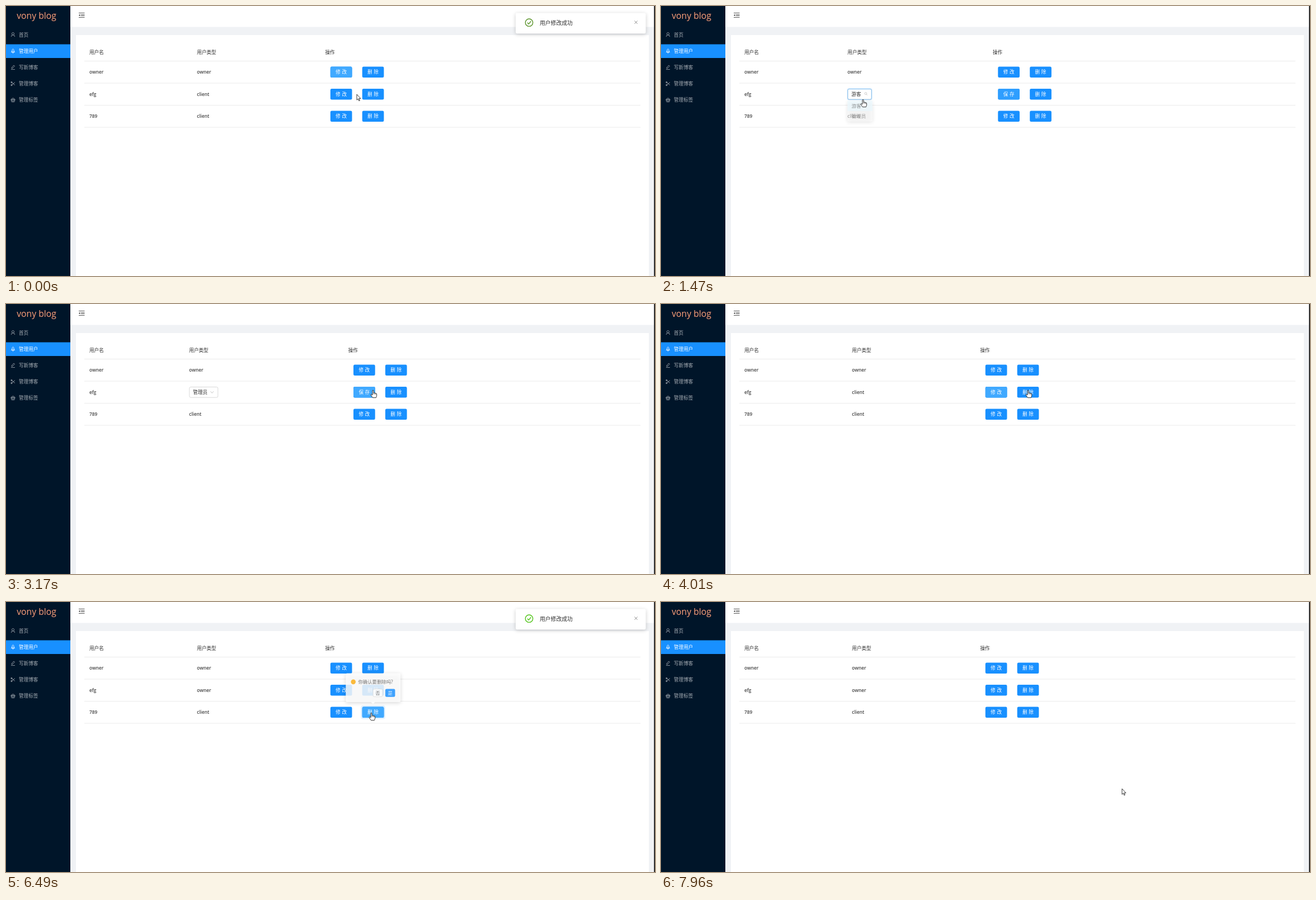
Recreate the animation shown at these times as an HTML page with a canvas. Size 1160 px wide and 483 px high, loop 8000 ms.

```html
<!DOCTYPE html>
<html lang="en">
<head>
<meta charset="utf-8">
<style>
html, body { margin: 0; width: 100%; height: 100%; overflow: hidden; background: #f0f2f5; }
canvas { display: block; }
</style>
</head>
<body>
<canvas id="stage" width="1160" height="483"></canvas>
<script>
const LOOP = 8000;
const ctx = document.getElementById('stage').getContext('2d');
const BLUE = '#1890ff', LIGHT = '#40a9ff', DARK = '#303030';

// Key moments of the story, in ms
const EDIT = 540, OPEN = 1400, PICK = 1950, BLUR = 2930, SAVE = 3780, DONE = 3940,
  UPDATED = 4500, ASK = 6400, CLOSE = 7260;

// time, x, y of the pointer tip, pointer shape from then on
const pointerKeys = [
  [0, 627, 158, 'arrow'], [80, 627, 158, 'arrow'], [360, 606, 157, 'hand'], [620, 606, 157, 'hand'],
  [850, 560, 162, 'arrow'], [1310, 361, 164, 'hand'], [1470, 361, 167, 'hand'], [1700, 357, 180, 'hand'],
  [1780, 356, 200, 'hand'], [1930, 356, 200, 'hand'], [2010, 375, 202, 'arrow'], [2390, 640, 180, 'arrow'],
  [2470, 656, 177, 'arrow'], [2700, 674, 155, 'arrow'], [2780, 656, 154, 'hand'], [4470, 656, 154, 'hand'],
  [4930, 662, 161, 'hand'], [6020, 662, 161, 'hand'], [6180, 656, 176, 'arrow'], [6330, 653, 198, 'hand'],
  [6560, 653, 198, 'hand'], [6800, 684, 168, 'hand'], [7030, 685, 163, 'hand'], [7260, 685, 163, 'hand'],
  [7420, 710, 190, 'arrow'], [7880, 822, 330, 'arrow'], [7960, 824, 334, 'arrow']
];

const arrowPath = new Path2D('M0 0V10.2L2.3 8.1L3.9 11.8L5.4 11.1L3.9 7.6H7Z');
const handPath = new Path2D('M-1 1Q0 -.8 1.1 1V5Q2.4 4.2 3.1 5.4Q4.4 4.8 5 6Q6.6 5.6 6.6 7.5V10.2L5.4 13.6H-.6L-3.7 9Q-4 7.3 -2.6 7.6L-1 9Z');

const ramp = (t, start, length) => Math.max(0, Math.min(1, (t - start) / length));
const pulse = (t, on, off, fade = 120) => ramp(t, on, fade) * (1 - ramp(t, off, fade));

function text(value, x, y, { size = 8.6, color = DARK, weight = 400, align = 'left' } = {}) {
  ctx.font = `${weight} ${size}px "Open Sans", "Noto Sans CJK SC", "Noto Sans CJK", sans-serif`;
  ctx.fillStyle = color;
  ctx.textAlign = align;
  ctx.fillText(value, x, y + size * 0.36);
}

function rect(x, y, w, h, color) {
  ctx.fillStyle = color;
  ctx.fillRect(x, y, w, h);
}

function box(x, y, w, h, fill, stroke, radius = 2.4) {
  ctx.beginPath();
  ctx.roundRect(x, y, w, h, radius);
  if (fill) { ctx.fillStyle = fill; ctx.fill(); }
  if (stroke) { ctx.strokeStyle = stroke; ctx.stroke(); }
}

function line(path, color, width = 1) {
  ctx.strokeStyle = color;
  ctx.lineWidth = width;
  ctx.stroke(new Path2D(path));
  ctx.lineWidth = 1;
}

function layer(alpha, draw) {
  if (alpha <= 0) return;
  ctx.save();
  ctx.globalAlpha *= alpha;
  draw();
  ctx.restore();
}

function panel(x, y, w, h) {
  ctx.save();
  ctx.shadowColor = 'rgba(0,0,0,.2)';
  ctx.shadowBlur = 7;
  ctx.shadowOffsetY = 1.5;
  box(x, y, w, h, '#fff');
  ctx.restore();
}

function button(x, y, label, lit = 0, glow = 0) {
  layer(glow, () => box(x - 2.5, y - 12.3, 43.7, 24.6, 'rgba(24,144,255,.17)', null, 4));
  box(x, y - 9.8, 38.7, 19.6, BLUE);
  layer(lit, () => box(x, y - 9.8, 38.7, 19.6, LIGHT));
  text(label[0], x + 9.4, y, { color: '#fff', weight: 500 });
  text(label[1], x + 20.6, y, { color: '#fff', weight: 500 });
}

function sidebar() {
  rect(0, 0, 115, 483, '#001529');
  text('vony blog', 54.5, 17.5, { size: 15.7, color: '#ffa07a', align: 'center' });
  rect(0, 68.5, 115, 24.5, BLUE);
  const icons = [
    'M9.3 55Q9.3 51.7 12.5 51.7T15.7 55M14.6 49.7A2.1 2.1 0 1 1 10.4 49.7A2.1 2.1 0 1 1 14.6 49.7',
    'M11 82.5V79Q11 77.5 12.5 76.6Q14 77.5 14 79V82.5ZM11 80L9.5 82.7H15.5L14 80M12.5 83V85',
    'M9 113.5H16M10 111.7L10.5 109.5L14 106L15.5 107.5L12 111Z',
    'M9.5 136L16 141.5M9.5 142L16 136.5M9 135.6h1.8v1.8h-1.8zM9 140.6h1.8v1.8h-1.8z',
    'M12.5 164.5L16.2 167.2L14.8 171.6H10.2L8.8 167.2ZM12.5 166.5L14.4 168L13.7 170H11.3L10.6 168ZM9 167.2H16'
  ];
  ['首页', '管理用户', '写新博客', '管理博客', '管理标签'].forEach((label, i) => {
    const color = i === 1 ? '#fff' : '#a6adb4';
    line(icons[i], color, 0.8);
    text(label, 23, 51.5 + i * 29.2, { color, weight: i === 1 ? 500 : 400 });
  });
}

function frame() {
  rect(0, 0, 1160, 483, '#f0f2f5');
  rect(115, 0, 1043, 37.5, '#fff');
  rect(125, 52, 1024, 431, '#fff');
  sidebar();
  line('M130 12.5H140.5M134 15.5H140.5M134 17.5H140.5M130 20.5H140.5', '#444', 0.9);
  ctx.fillStyle = '#444';
  ctx.fill(new Path2D('M130 16.5L132.5 14.6V18.4Z'));
}

function select(t, x) {
  const picked = t >= PICK, w = picked ? 52 : 43.5;
  const focus = pulse(t, OPEN, BLUR);
  layer(focus, () => box(x - 1, 147, w + 2, 21.6, 'rgba(24,144,255,.2)', null, 3.4));
  box(x + .5, 148.5, w - 1, 18.7, '#fff', '#d9d9d9');
  layer(focus, () => box(x + .5, 148.5, w - 1, 18.7, null, LIGHT));
  text(picked ? '管理员' : '游客', x + 7, 158);
  const ix = x + w - 11;
  if (t >= OPEN && t < PICK) {
    line(`M${ix + 2} 156.5a1.9 1.9 0 1 1 -3.8 0a1.9 1.9 0 1 1 3.8 0M${ix + 1.5} 158L${ix + 3} 159.7`, '#bfbfbf', 0.8);
  } else {
    line(`M${ix - 2.7} 156.2L${ix} 159.4L${ix + 2.7} 156.2`, '#bfbfbf', 0.9);
  }
}

function dropdown(t) {
  const shown = pulse(t, OPEN, PICK, 130);
  layer(shown, () => {
    const x = 333.3, hover = t >= 1700;
    ctx.translate(0, 169.5);
    ctx.scale(1, 0.86 + 0.14 * shown);
    panel(x, 0, 44.5, 39.4);
    rect(x, 0, 44.5, 19.7, hover ? '#fafafa' : '#e6f7ff');
    if (hover) rect(x, 19.7, 44.5, 19.7, '#e6f7ff');
    text('游客', x + 7.3, 9.9, { color: '#444', weight: hover ? 500 : 400 });
    text('管理员', x + 7.3, 29.5, { color: '#444' });
  });
}

function table(t) {
  const editing = t >= EDIT && t < DONE;
  const [typeX, actionX] = !editing ? [341.3, 570.5] : t < PICK ? [333.3, 593] : [327.3, 611.7];
  text('用户名', 149, 82.5, { weight: 500 });
  text('用户类型', typeX, 82.5, { weight: 500 });
  text('操作', actionX, 82.5, { weight: 500 });
  for (const y of [98, 137.5, 177, 216.5]) rect(140, y, 994, 1, '#ebebeb');

  const cell = { size: 8.3, weight: 600, color: '#444' };
  const editLit = [
    1 - ramp(t, 480, 100),
    Math.max(pulse(t, 330, OPEN, 160), pulse(t, BLUR, ASK - 30)),
    0
  ];
  const removeLit = [0, pulse(t, 4030, 6120), pulse(t, 6330, 7300)];
  const removeGlow = [0, 0, pulse(t, 6400, 6750)];
  const roles = ['owner', t >= UPDATED + 60 ? 'owner' : 'client', 'client'];
  ['owner', 'efg', '789'].forEach((name, i) => {
    const y = 118.3 + i * 39.5, edited = editing && i === 1;
    text(name, 149, y, cell);
    if (edited) select(t, typeX);
    else text(roles[i], typeX, y, cell);
    const saveGlow = i === 1 ? pulse(t, SAVE - 60, DONE - 60, 60) : 0;
    button(actionX + 9.3, y, edited ? '保存' : '修改', editLit[i], saveGlow);
    button(actionX + 66.2, y, '删除', removeLit[i], removeGlow[i]);
  });
}

function confirmBox(t) {
  const shown = pulse(t, ASK, CLOSE, 110);
  layer(shown, () => {
    const scale = 0.85 + 0.15 * shown;
    ctx.translate(656, 183);
    ctx.scale(scale, scale);
    ctx.translate(-656, -183);
    panel(606, 126, 100.5, 53);
    ctx.fillStyle = '#fff';
    ctx.fill(new Path2D('M652 178.5H660L656 182.8Z'));
    ctx.fillStyle = '#faad14';
    ctx.beginPath();
    ctx.arc(619.8, 141.8, 4.4, 0, Math.PI * 2);
    ctx.fill();
    text('你确认要删除吗?', 628.7, 142, { color: '#595959' });
    box(656, 155, 17.5, 14, '#fff', '#d9d9d9');
    text('否', 664.7, 162, { color: '#595959', align: 'center' });
    box(678.5, 154.7, 18, 14.8, BLUE);
    layer(ramp(t, 6800, 150), () => box(678.5, 154.7, 18, 14.8, LIGHT));
    text('是', 687.5, 162, { color: '#fff', align: 'center' });
  });
}

function toast(t) {
  const first = t < 2000;
  const enter = first ? 1 : ramp(t, UPDATED, 180);
  const leave = ramp(t, first ? 1000 : 6600, 140);
  layer(enter * (1 - leave), () => {
    ctx.translate(247 * (1 - enter) ** 2, 0);
    panel(911, 12.5, 232.5, 36.7);
    const green = first ? '#5b942b' : '#52c41a';
    line('M941.7 29.7A6.7 6.7 0 1 1 928.3 29.7A6.7 6.7 0 1 1 941.7 29.7M931.9 29.7L934.3 32.2L938.3 27.2', green, 1.4);
    text('用户修改成功', 954, 30, { size: 9.8 });
    line('M1123.4 26.3L1128.6 32M1128.6 26.3L1123.4 32', '#8c8c8c', 0.9);
  });
}

function pointer(t) {
  let i = pointerKeys.findLastIndex(key => key[0] <= t);
  const a = pointerKeys[i], b = pointerKeys[Math.min(i + 1, pointerKeys.length - 1)];
  const p = a === b ? 0 : (t - a[0]) / (b[0] - a[0]);
  ctx.save();
  ctx.translate(a[1] + (b[1] - a[1]) * p, a[2] + (b[2] - a[2]) * p);
  const shape = a[3] === 'hand' ? handPath : arrowPath;
  ctx.fillStyle = '#fff';
  ctx.fill(shape);
  ctx.strokeStyle = '#222';
  ctx.lineWidth = 0.9;
  ctx.lineJoin = 'round';
  ctx.stroke(shape);
  if (a[3] === 'hand') line('M1.1 5V7.5M3.1 5.4V7.7M5 6V8', '#222', 0.7);
  ctx.restore();
}

function render(now) {
  const t = now % LOOP;
  frame();
  table(t);
  dropdown(t);
  confirmBox(t);
  toast(t);
  rect(1158.3, 0, 1.7, 483, '#111');
  pointer(t);
  requestAnimationFrame(render);
}
requestAnimationFrame(render);
</script>
</body>
</html>
```
